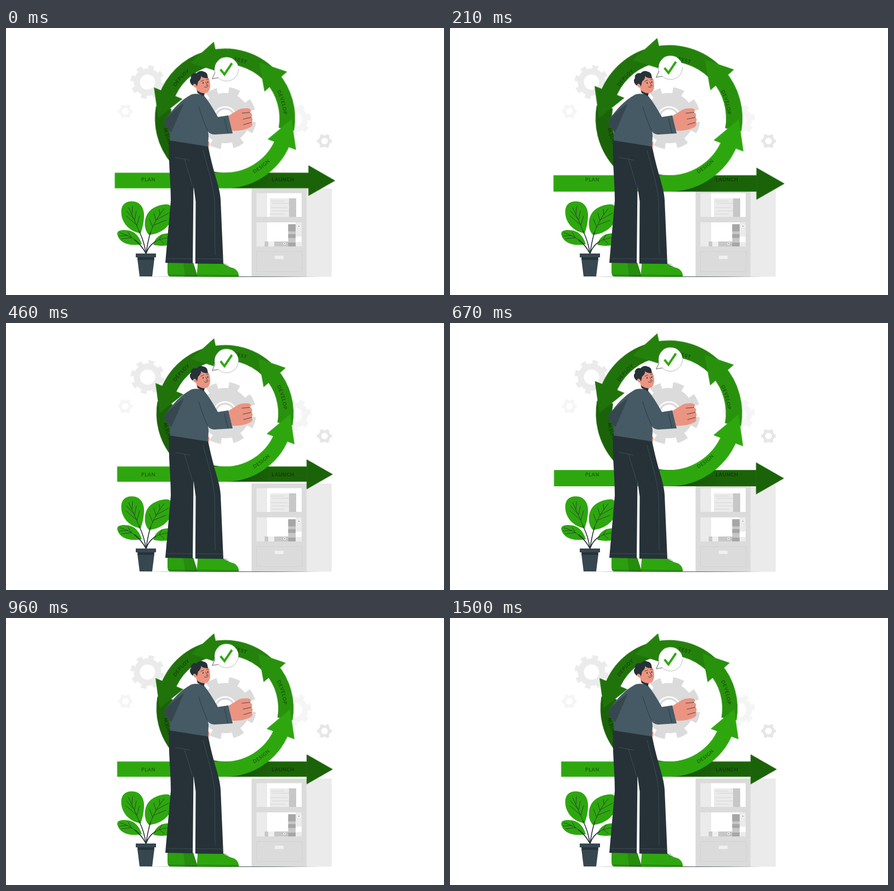
Animation, 800 px wide and 489 px high, one loop 1.54 s. Source, as an HTML page without scripts:

```html
<!DOCTYPE html>
<html lang="en">
<head>
<meta charset="utf-8">
<title>Development cycle</title>
<style>
  html, body { margin: 0; height: 100%; overflow: hidden; background: #fff; }
  svg { display: block; width: 100%; height: 100%; }

  /* 37 held poses per loop */
  .cycle, .bubble { animation: pulse 1540ms -3ms infinite; }
  .cycle { transform-origin: 400px 166.2px; }
  .bubble { animation-name: float; }
  @keyframes pulse {
    0%      { transform: scale(1.0222); animation-timing-function: steps(3); }
    8.108%  { transform: scale(1.1); animation-timing-function: steps(7); }
    27.027% { transform: scale(1); animation-timing-function: steps(1); }
    37.838% { transform: scale(1.0111); animation-timing-function: steps(3); }
    45.946% { transform: scale(1.0944); animation-timing-function: steps(1); }
    48.649% { transform: scale(1.0778); animation-timing-function: steps(3); }
    56.757%, 100% { transform: scale(1); animation-timing-function: steps(1); }
  }
  @keyframes float {
    0%      { transform: translateY(-.43px); animation-timing-function: steps(17); }
    45.946% { transform: translateY(-9.67px); animation-timing-function: steps(18); }
    94.595% { transform: translateY(-.11px); animation-timing-function: steps(1); }
    97.297%, 100% { transform: translateY(-.43px); animation-timing-function: steps(1); }
  }

  .gear circle { fill: none; stroke: currentColor; stroke-width: 11; }
  .gear .teeth { stroke-width: 7; stroke-dasharray: .48 .52; stroke-dashoffset: .24; }
  .gear .wide { stroke-width: 13; }
  .band path { fill: none; stroke: currentColor; stroke-width: 28; }
  .band polygon { fill: currentColor; }
  .labels { font: bold 9px Lato, sans-serif; letter-spacing: .65px; text-anchor: middle; fill: #000; fill-opacity: .42; }
  .green { fill: #2ea70f; }
  .ink { fill: #263238; }
  .slate { fill: #37474f; }
  .skin { fill: #eb9481; }
  .line { fill: none; stroke: #263238; stroke-width: .8; stroke-linecap: round; stroke-linejoin: round; }
  .seam { fill: none; stroke: #455a64; stroke-width: .7; }
</style>
</head>
<body>
<svg viewBox="0 0 800 489">
  <defs>
    <linearGradient id="fold" gradientUnits="userSpaceOnUse" x1="410" y1="0" x2="490" y2="0">
      <stop offset="0" stop-color="#165207"/>
      <stop offset="1" stop-color="#1b6309"/>
    </linearGradient>
    <path id="outward" pathLength="360" d="M400 272.5A107 107 0 0 1 400 58.5A107 107 0 0 1 400 272.5"/>
    <path id="inward" pathLength="360" d="M400 51.5A114 114 0 0 0 400 279.5A114 114 0 0 0 400 51.5"/>
  </defs>

  <!-- background gears -->
  <g class="gear" color="#ebebeb" transform="translate(258.5 99) rotate(14)">
    <circle r="19.5"/><circle class="teeth" r="27.5" pathLength="8"/>
  </g>
  <g class="gear" color="#f5f5f5" transform="translate(218 152.5) scale(.435)">
    <circle r="19.5"/><circle class="teeth" r="27.5" pathLength="6"/>
  </g>
  <g class="gear" color="#f5f5f5" transform="translate(527.5 168) rotate(-62) scale(.95)">
    <circle r="19.5"/><circle class="teeth" r="27.5" pathLength="7"/>
  </g>
  <g class="gear" color="#e6e6e6" transform="translate(581.7 207) scale(.435)">
    <circle r="19.5"/><circle class="teeth" r="27.5" pathLength="6"/>
  </g>

  <!-- cabinet -->
  <path fill="#ebebeb" d="M549 294H595V455.500H549z"/>
  <path fill="#dbdbdb" d="M448.500 294H549V455.500H448.500z"/>
  <path fill="#fff" d="M477 302.500H540V346H477zM477 356H540V400H477z"/>
  <path fill="#ebebeb" d="M457.500 302.500H477V346H457.500zM457.500 356H477V400H457.500zM482 312H517V346H482zM529 356H540V382H529zM529 392H540V400H529z"/>
  <path fill="#c7c7c7" d="M517 312H530V346H517zM515.500 359.500H529V400H515.500zM472.500 391H479V400H472.500zM490 391H515.500V400H490z"/>
  <path fill="#f0f0f0" d="M479 391H490V400H479zM491 417H507V423H491z"/>
  <path fill="#a6a6a6" d="M515.500 359.500H529V372.500H515.500zM515.500 377.500H529V384.500H515.500zM515.500 393H529V400H515.500z"/>
  <path fill="none" stroke="#d0d0d0" stroke-width=".8" d="M457.500 409.500H541V446H457.500zM484 317H508M487 321H517M484 329H514M486 335H517M483 341H509"/>
  <g fill="#fff"><circle cx="509" cy="395" r="2.300"/><circle cx="535" cy="363" r="2.300"/></g>
  <g fill="#777"><circle cx="509" cy="395" r="1"/><circle cx="535" cy="363" r="1"/></g>
  <path fill="#263238" d="M232 455.500L400 455L572 455.500L400 456z"/>

  <!-- cycle, from the lowest segment to the top one -->
  <g class="cycle">
    <g class="band" color="#1b6309">
      <path d="M290.400 146.200A111.250 111.250 0 0 0 400 276.750"/>
      <path style="stroke:url(#fold)" d="M400 276.740L549.500 276.760"/>
      <polygon points="549,249.500 597,277 549,304.500"/>
    </g>
    <g class="band" color="#20730b">
      <path d="M365.600 59.700A111.250 111.250 0 0 0 294.800 129.300"/>
      <polygon points="273,110 324,130.500 280.500,165"/>
    </g>
    <g class="band" color="#24820c">
      <path d="M478.700 86.800A111.250 111.250 0 0 0 376.900 56.700"/>
      <polygon points="338,66 380,28 392,83"/>
    </g>
    <g class="band" color="#29920d">
      <path d="M509.600 184.800A111.250 111.250 0 0 0 484 92.500"/>
      <polygon points="461,65 511,82 470.500,117.500"/>
    </g>
    <g class="band" color="#2ea70f">
      <path d="M203 276.750H400A111.250 111.250 0 0 0 506.400 198"/>
      <polygon points="519,167 527,222 476,203"/>
    </g>
  </g>

  <g class="labels">
    <text x="260" y="281">PLAN</text>
    <text x="505.900" y="281">LAUNCH</text>
    <text><textPath href="#outward" startOffset="71.300">REVIEW</textPath></text>
    <text><textPath href="#outward" startOffset="133">DEPLOY</textPath></text>
    <text><textPath href="#outward" startOffset="195.100">TEST</textPath></text>
    <text><textPath href="#outward" startOffset="254.300">DEVELOP</textPath></text>
    <text><textPath href="#inward" startOffset="217.100">DESIGN</textPath></text>
  </g>

  <!-- centre gear -->
  <g class="gear" color="#dbdbdb" transform="translate(400 165) rotate(18.400)">
    <circle r="46" style="fill:#dbdbdb;stroke:none"/>
    <circle class="teeth wide" r="50.500" pathLength="8"/>
    <circle r="20.500" style="stroke:#fff;stroke-width:2.500"/>
    <circle r="15.500" style="fill:#fff;stroke:none"/>
  </g>

  <g class="bubble">
    <path fill="#fff" d="M381 80L376.500 93.500L389 92z"/>
    <circle cx="402.700" cy="75.700" r="22" fill="#fff"/>
    <path class="line" d="M381.500 82.500L376.700 93.400L387.500 91.500"/>
    <path class="line" style="stroke-width:.35" d="M387.500 91.500A22 22 0 0 0 424.700 75.700M381.500 82.500A22 22 0 0 1 388 59.500"/>
    <path fill="none" stroke="#2ea70f" stroke-width="4.200" d="M391.700 76.300L399 85.300L412.700 64.800"/>
  </g>

  <!-- plant -->
  <g class="green">
    <path d="M246 376C226 373 210.500 357 210.500 337C210.500 322 220 317 231 317.500C246 318 253 331 252 346C251.500 358 249 367 246 376z"/>
    <path d="M261 379C252 370 252 353 257 343C263 330 279 323 294 323C301 323 304 329 304 341C303 361 285 377 261 379z"/>
    <path d="M248 396C243 381 235 370 216 370C206 370 202 373 203.500 379C208 394 224 400 248 396z"/>
    <path d="M269 397C272 384 282 375 299 376V397C290 400 276 399 269 397z"/>
  </g>
  <path class="line" style="stroke-width:1.600" d="M255.500 413C253 393 248 382 243 372M256 413C258 396 261 384 264 374M255.500 413C250 402 244 395 235 388M256 413C259 403 265 396 273 391"/>
  <path class="line" d="M243 372C237 357 231 344 224 329M239 361L219 344M234 350L220 335M239 361L244 344M235 351L238 335M230 341L231 327
    M264 374C270 358 278 344 289 331M270 361L292 352M275 351L297 339M268 365L262 350M274 353L270 339M281 342L280 332
    M235 388C228 383 219 378 208 375M229 384L211 386M222 380L207 381M229 384L223 374
    M273 391C280 387 288 385 298 384M280 387L289 395M280 387L285 379"/>
  <path class="slate" d="M237 413H274V420H237zM240 423H271L267 455H244z"/>
  <path class="ink" d="M240 420H271L270.500 424.500H240.500z"/>

  <!-- person -->
  <path fill="#2b9f0e" d="M295 430H342L350 455H299C295 453 295 449 295 444z"/>
  <path fill="#258c0c" d="M324 430H342L350 455H327z"/>
  <path class="green" d="M350 431H396C401 435 408 438 416 440C422 443 426 449 425 455.500H349C348 449 350 442 350 431z"/>
  <path class="line" style="stroke-width:.6" d="M296 452.500L349 453.500M349 452.500L425 453.500M397 432L404 433M400 435L407 436"/>

  <path class="skin" d="M367 207C372 207 373 212 370 218L366 220z"/>
  <path class="ink" d="M298 204L369 216C373 236 377 252 381 266C386 284 391 298 392 315L397 432L345.800 431.500L346.500 318L342.500 288L341 431L291 430L301 316C301 280 296 240 298 204z"/>
  <path class="seam" d="M309 237L336 242M326 240C331 258 336 272 340 288M360 224C367 252 378 285 381 316L382 416M293 422L341 422.500M347 422.500L396 423"/>

  <path class="skin" d="M406 161L425 149.500C433 146.500 441 146.500 446 148.500C448 151 447 153.500 445.500 154.500C450 156 450.500 161 448 163.500C451.500 165.500 451 170.500 448.500 172.500C451.500 176 450 180.500 445 182.500C437 186.500 425 189 413 188z"/>
  <path class="line" d="M431 156L445.500 154.500M433 167L448 163.500M434 177L448.500 172.800"/>

  <path fill="#455a64" d="M338 122C345 120 355 120 361 123C371 135 379 149 387 163L406 160L414 193L382 195C376 195 371 193 369 189L370 197L369 217L299 206C300 197 300 190 297 186C291 181 289 176 290 169C303 150 318 133 338 122z"/>
  <path class="slate" d="M325 138C311 147 298 159 290 169C289 176 291 181 297 186L302 191z"/>
  <path class="line" d="M352 144C357 160 362 175 368 187M399 166L405.500 192.500"/>

  <path class="skin" d="M346 103L349 118L361 124L364 115z"/>
  <path class="ink" d="M349 114C353 118 358 119.500 363 119L361.500 125L350 119z"/>
  <path class="skin" d="M345 98C350 86 366 85 371 93C374 103 374 113 368 118C360 122 352 118 348 109C343 110 341 105 343 101z"/>
  <path class="ink" d="M341.500 106C336 102 334 95 338 92C336 87 342 81 348 83C352 78 358 78 361 80C365 80 368 84 368 87L369 92C364 92 359 91 356 88C357 93 353 96 351 98C350 101 350 104 348.500 107C347 101 342 100 341.500 106z"/>
  <g class="ink"><ellipse cx="360" cy="100.500" rx="1" ry="1.500"/><ellipse cx="368.500" cy="99" rx="1" ry="1.500"/></g>
  <path class="line" d="M356 97.500L361 95.500M366 94.500L369.500 94M365 99L368 105L365.500 106M362 107.500C365 110 368 108.500 369.500 105.500"/>
</svg>
</body>
</html>
```
